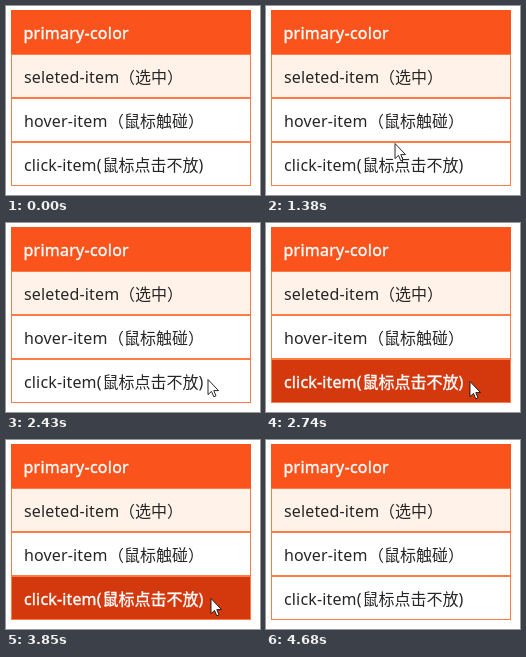
Write an HTML page that moves like this. It is 254x189 px and loops after 4960 ms.

```html
<!DOCTYPE html>
<html lang="zh-CN">
<head>
<meta charset="utf-8">
<title>Item states</title>
<style>
  html, body { margin: 0; width: 100%; height: 100%; overflow: hidden; background: #fff; }
  svg { display: block; width: 254px; height: 189px; }
  text { font: 16px "Noto Sans", "Noto Sans CJK SC", sans-serif; letter-spacing: .15px; fill: #262626; }
  .cjk { font-family: "Noto Sans CJK SC", "Noto Sans CJK", sans-serif; letter-spacing: 0; }
  .row rect { fill: #fff; stroke: #ff7a45; }
  .row.selected rect { fill: #fff2e8; }
  .row.hover text { fill: #ff7a45; }
  .row.pressed rect { fill: #d4380d; }
  .row.pressed text, .header { fill: #fff; stroke: #fff; stroke-width: .35px; }
  .header { letter-spacing: .25px; }
  .cursor { fill: #fff; stroke: #111; stroke-width: .9; stroke-linejoin: round; }
</style>
</head>
<body>
<svg viewBox="0 0 254 189">
  <rect x="5" y="4" width="240" height="44" fill="#fa541c"/>
  <text class="header" x="17.5" y="33">primary-color</text>
  <g class="row selected">
    <rect x="5.5" y="48.5" width="239" height="43"/>
    <text x="18" y="77">seleted-item<tspan class="cjk" x="113">（选中）</tspan></text>
  </g>
  <g class="row" id="hoverRow">
    <rect x="5.5" y="92.5" width="239" height="43"/>
    <text x="18" y="121">hover-item<tspan class="cjk" x="102">（鼠标触碰）</tspan></text>
  </g>
  <g class="row" id="clickRow">
    <rect x="5.5" y="136.5" width="239" height="43"/>
    <text x="18" y="165">click-item(<tspan class="cjk" x="96.5">鼠标点击不放</tspan><tspan x="192.5">)</tspan></text>
  </g>
  <path class="cursor" id="arrow" d="M1 .5V15.6L4.5 12.4L6.8 17.8L9 16.9L6.8 11.6H11.5Z"/>
  <path class="cursor" id="hand" d="M5.5 2a1.6 1.6 0 0 1 3.2 0V8C9.5 7.1 11.4 7.3 11.6 8.7C12.6 7.9 14.1 8.3 14.3 9.7C15.4 9.1 16.8 9.7 16.8 11.5V15.5C16.8 18.2 15 19.1 15 22.6H7C7 20 4 18 1.2 13.1C.5 11.5 2 10 3.5 11.2L5.5 13.3ZM8.7 8V11.5M11.6 8.7V11.8M14.3 9.7V12.3"/>
</svg>
<script>
const LOOP = 4960;
const byId = id => document.getElementById(id);
const [hoverRow, clickRow, arrow, hand] = ["hoverRow", "clickRow", "arrow", "hand"].map(byId);

// [start time, cursor, left, top]; the pointer jumps between samples
const pointer = [
  [0, null, 0, 0],
  [440, arrow, 79, 173],
  [560, arrow, 69, 146],
  [680, hand, 57, 118],
  [830, hand, 55, 115],
  [950, hand, 55, 114],
  [1070, hand, 56, 115],
  [1380, arrow, 128, 137],
  [1500, hand, 185, 129],
  [1650, hand, 192, 129],
  [1770, hand, 196, 127],
  [1920, hand, 195, 122],
  [2190, arrow, 199, 140],
  [2310, arrow, 200, 150],
  [2430, arrow, 201, 156],
  [2590, arrow, 203, 158],
  [3570, arrow, 204, 158],
  [4560, arrow, 214, 173],
  [4680, null, 0, 0],
];
const presses = [[2740, 3290], [3850, 4400]];

function draw(now) {
  const t = now % LOOP;
  const [, cursor, x, y] = pointer.findLast(([start]) => start <= t);
  for (const shape of [arrow, hand]) {
    shape.style.display = shape === cursor ? "" : "none";
    shape.setAttribute("transform", `translate(${x} ${y})`);
  }
  hoverRow.classList.toggle("hover", cursor === hand);
  clickRow.classList.toggle("pressed", presses.some(([from, to]) => t >= from && t < to));
}

const origin = performance.now();
function tick() {
  draw(performance.now() - origin);
  requestAnimationFrame(tick);
}
tick();
</script>
</body>
</html>
```
